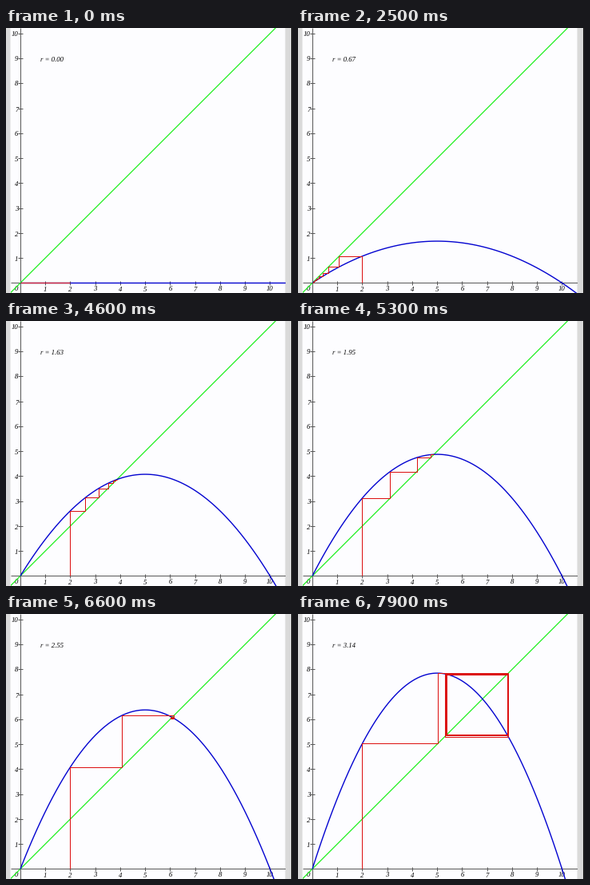
Write a matplotlib script that moves like this. It is 358x332 px and loops after 8000 ms.

```python
import numpy as np
import matplotlib.pyplot as plt
from matplotlib.animation import FuncAnimation
from matplotlib.patches import Rectangle

W, H, DPI = 358, 332, 64
PX = 72 / DPI                      # one pixel in points
OX, OY, UNIT = 17.95, 319.4, 31.25
LEFT, RIGHT = 5.5, 349.5           # edges of the white page
FRAMES, STEP_MS = 80, 100
ITERATIONS = 100

# growth rate against frame number
KEY_FRAMES = [10, 17, 34, 46, 59, 66, 79]
KEY_RATES = [0, 0.32, 1.07, 1.63, 2.23, 2.55, 3.14]

plt.rcParams["text.hinting"] = "none"
plt.rcParams["path.simplify"] = False

fig = plt.figure(figsize=(W / DPI, H / DPI), dpi=DPI, facecolor="#dadada")
ax = fig.add_axes([0, 0, 1, 1])
ax.set_xlim(0, W)
ax.set_ylim(H, 0)
ax.axis("off")


def block(x, width, color):
    rect = Rectangle((x, -2), width, H + 4, fc=color, ec="none", zorder=0, snap=False)
    return ax.add_patch(rect)


page = block(LEFT, RIGHT - LEFT, "#fdfdff")
block(W - 1, 2, "#101010")


def sx(x):
    return OX + UNIT * np.asarray(x, float)


def sy(y):
    return OY - UNIT * np.asarray(y, float)


def stroke(xs, ys, color, width, z):
    line, = ax.plot(xs, ys, color=color, lw=width * PX, zorder=z,
                    solid_capstyle="butt", solid_joinstyle="miter")
    line.set_clip_path(page)
    return line


def label(x, y, text, align="center"):
    return ax.text(x, y, text, family="Liberation Serif", style="italic",
                   size=8.8 * PX, color="black", ha=align, va="baseline", zorder=2)


def logistic(x, r):
    return r * x * (1 - x / 10)


def cobweb(r):
    x, pts = 2.0, [(2.0, 0.0)]
    for _ in range(ITERATIONS):
        y = logistic(x, r)
        pts += [(x, y), (y, y)]
        x = y
    return np.array(pts).T


AXIS, TICK = "#585858", 2.7
stroke([LEFT, RIGHT], [OY, OY], AXIS, 1, 1)
stroke([OX, OX], [0, H], AXIS, 1, 1)
label(13, 330, "0")
for n in range(1, 11):
    tx, ty = float(sx(n)), float(sy(n))
    stroke([tx, tx], [OY - TICK, OY + TICK], AXIS, 1, 1)
    stroke([OX - TICK, OX + TICK], [ty, ty], AXIS, 1, 1)
    label(tx, 330, str(n))
    label(15.5, ty + 4, str(n), "right")

diagonal = np.array([-1, 11])
stroke(sx(diagonal), sy(diagonal), "#20f020", 1.25, 3)

grid = np.linspace(0, 10.8, 300)
curve = stroke(sx(grid), sy(0 * grid), "#0404d0", 1.4, 4)
web = stroke([], [], "#dc1010", 1, 5)
readout = label(43, 43, "r = 0.00", "left")


def draw(i):
    r = round(float(np.interp(i, KEY_FRAMES, KEY_RATES)), 2)
    curve.set_ydata(sy(logistic(grid, r)))
    wx, wy = cobweb(r)
    web.set_data(sx(wx), sy(wy))
    readout.set_text(f"r = {r:.2f}")
    return curve, web, readout


anim = FuncAnimation(fig, draw, frames=FRAMES, interval=STEP_MS,
                     init_func=lambda: draw(0), repeat=True, repeat_delay=0)
plt.show()
```
